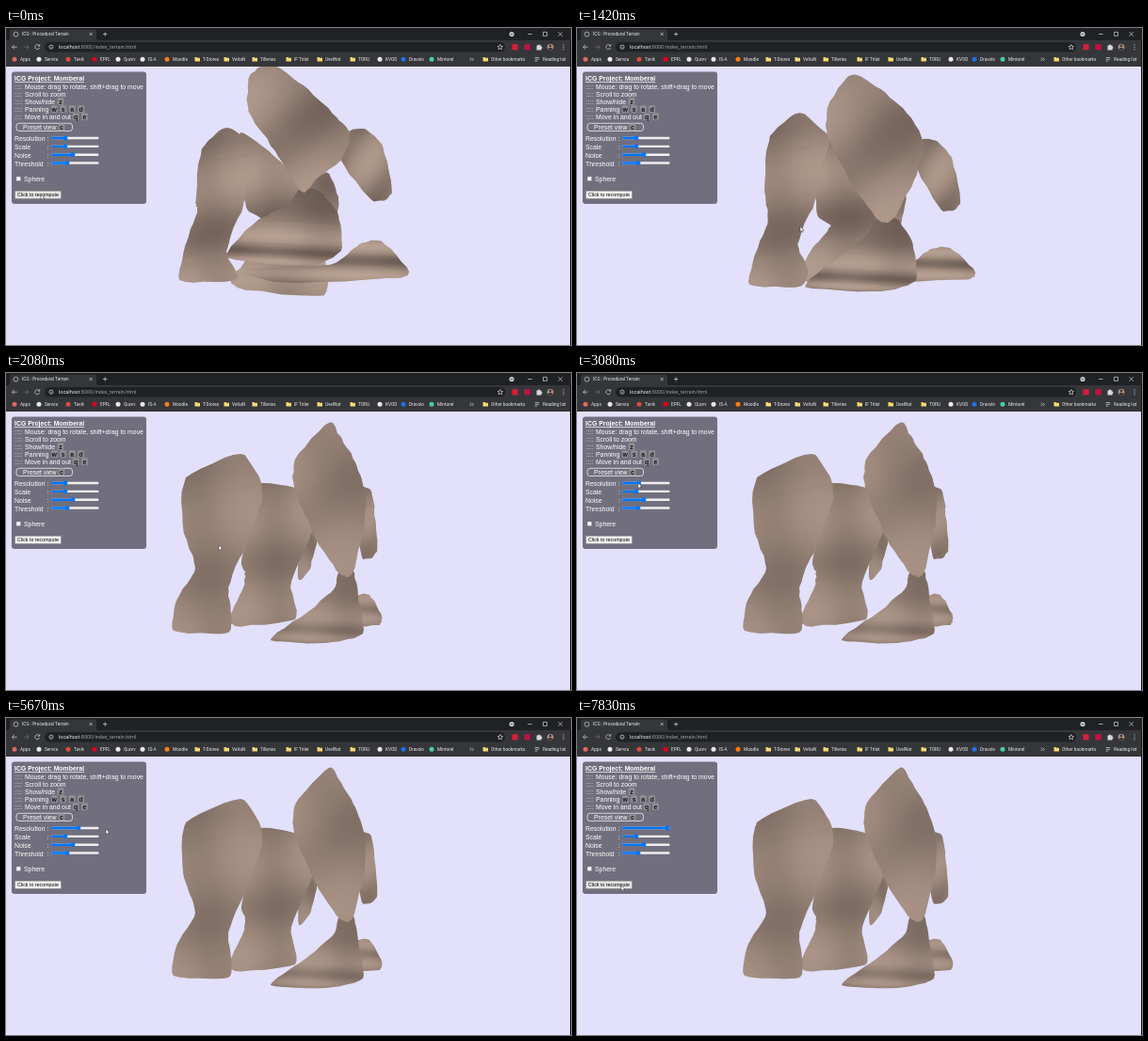
Animation of 600 by 337 pixels, one loop 8 s. Source, as an HTML page with a canvas:

```html
<!DOCTYPE html>
<html lang="en">
<head>
<meta charset="utf-8">
<title>Procedural Terrain</title>
<style>
html, body { margin: 0; width: 100%; height: 100%; overflow: hidden; background: #e2e0fa; }
canvas, svg { position: absolute; left: 0; top: 0; width: 100%; height: 100%; display: block; }
text { white-space: pre; }
.ui { font: 4.75px Roboto, "Open Sans", sans-serif; fill: #e8eaed; }
.panel { font: 6.88px "Liberation Sans", Arial, sans-serif; fill: #fff; }
.panel .key { font-weight: bold; fill: #16161a; text-anchor: middle; }
.line { fill: none; stroke: #d5d7da; stroke-width: .7; }
</style>
</head>
<body>
<canvas id="stage"></canvas>
<svg viewBox="0 0 600 337" preserveAspectRatio="none">
  <g class="ui">
    <rect width="600" height="13" fill="#202124"/>
    <path d="M0 13H2Q4 13 4 10V4Q4 1.5 6.5 1.5H93Q96 1.5 96 4V10Q96 13 98 13H600V41H0Z" fill="#35363a"/>
    <circle cx="10.5" cy="6.7" r="2.4" class="line"/>
    <text x="17" y="8.4">ICG : Procedural Terrain</text>
    <path class="line" d="M88.7 5l3 3m0-3l-3 3M103 6.5h4.4M105.2 4.3v4.4M554 6.5h4.5M570.5 4.4h4v4h-4zM586.5 4.3l4.4 4.4m0-4.4l-4.4 4.4"/>
    <circle cx="537" cy="6.5" r="2.6" fill="#c8cacd"/>
    <path d="M535.8 6l1.2 1.3 1.2-1.3" fill="none" stroke="#111" stroke-width=".6"/>
    <rect x="41" y="15" width="489" height="10.5" rx="5.2" fill="#202124"/>
    <path class="line" d="M11.6 20.2H6.6m2.3-2.4l-2.4 2.4 2.4 2.4"/>
    <path class="line" d="M19 20.2h5m-2.3-2.4l2.4 2.4-2.4 2.4" style="stroke:#777"/>
    <path class="line" d="M35.4 18.8a2.5 2.5 0 1 0 .2 2.3M35.8 17.3v1.9h-1.9"/>
    <circle class="line" cx="48" cy="20.2" r="2.1"/>
    <path class="line" d="M48 19.8v1.5M48 18.6v.5"/>
    <text x="56" y="22.1" style="font-size:5.5px">localhost<tspan fill="#9aa0a6">:8000/index_terrain.html</tspan></text>
    <path class="line" d="M524.8 17.5l.8 1.8 2 .2-1.5 1.3.4 2-1.7-1-1.7 1 .4-2-1.5-1.3 2-.2z"/>
    <rect x="537.5" y="17.3" width="6" height="6" fill="#d81f3c"/>
    <rect x="550.5" y="17.3" width="6" height="6" fill="#c81040"/>
    <path d="M563.5 18.5h1.5a1 1 0 0 1 2 0h1.5v1.6a1 1 0 0 1 0 2v1.4h-5z" fill="#d5d7da"/>
    <circle cx="578" cy="20.3" r="3.4" fill="#a98d82"/>
    <path d="M575.2 22.3q2.8-2.6 5.6 0a3.4 3.4 0 0 1-5.6 0M576.8 19a1.2 1.2 0 1 0 2.4 0 1.2 1.2 0 1 0-2.4 0" fill="#3b2d2b"/>
    <path d="M592 17.4v1m0 1.4v1m0 1.4v1" stroke="#d5d7da"/>
    <g id="marks"></g>
    <path class="line" d="M472 31.6l1.7 1.7-1.7 1.7m2.3-3.4l1.7 1.7-1.7 1.7" transform="translate(20.5)"/>
    <path class="line" d="M561.7 31.5h4.5m-4.5 1.8h4.5m-4.5 1.8h2.5"/>
  </g>
  <rect x="599" y="13" width="1" height="324" fill="#111"/>
  <g class="panel">
    <rect x="6" y="46.5" width="143" height="140.5" rx="3" fill="#716f7e"/>
    <text x="9" y="56" font-weight="bold" text-decoration="underline">ICG Project: Momberal</text>
    <g id="help"></g>
    <rect x="11" y="101.3" width="59.5" height="8.2" rx="2.8" fill="none" stroke="#fff" stroke-width=".7"/>
    <text x="18" y="107.8">Preset view</text>
    <g id="keys"></g>
    <g id="sliders"></g>
    <rect x="11" y="158" width="4.6" height="4.6" rx=".7" fill="#fff" stroke="#767676" stroke-width=".4"/>
    <text x="19" y="163">Sphere</text>
    <rect id="button" x="9.5" y="173.3" width="49" height="8.2" rx=".8" stroke="#767676" stroke-width=".4"/>
    <text x="12" y="179.3" style="font-size:5.3px;fill:#000">Click to recompute</text>
  </g>
  <path id="cursor" d="M0 0V5.6L1.3 4.4 2.2 6.4 3.1 6 2.2 4.1H4Z" fill="#fff" stroke="#222" stroke-width=".45"/>
</svg>
<script>
const TICK = 1000 / 12, TICKS = 96, RECOMPUTE = 54, SKY = '#e2e0fa';
const $ = id => document.getElementById(id);

function add(parent, tag, attrs, text) {
  const el = document.createElementNS('http://www.w3.org/2000/svg', tag);
  for (const k in attrs) el.setAttribute(k, attrs[k]);
  if (text) el.textContent = text;
  return parent.appendChild(el);
}

// Bookmarks bar: label, text x, icon colour
const FOLDER = '#f8d775', PLAIN = '#e8e8e8';
[['Apps', 15, '#e0695c'], ['Senvia', 41, PLAIN], ['Tavik', 72, '#e24a3b'], ['EPFL', 100, '#e2001a'],
 ['Quorv', 125, PLAIN], ['IS-A', 151, PLAIN], ['Moodle', 177, '#f98012'], ['T-Stores', 209, FOLDER],
 ['VeltaN', 240, FOLDER], ['Tilleries', 270, FOLDER], ['IF Trilet', 306, FOLDER], ['UvelNot', 339, FOLDER],
 ['TORU', 374, FOLDER], ['KVOD', 403, PLAIN], ['Dravolo', 428, '#1d73e8'], ['Mintorel', 458, '#45cfa5'],
 ['Other bookmarks', 515, FOLDER], ['Reading list', 570]
].forEach(([label, x, fill]) => {
  add($('marks'), 'text', { x, y: 35 }, label);
  if (fill === FOLDER) add($('marks'), 'path', { d: `M${x - 8.5} 31h2l.7.8h2.8v3.8h-5.5z`, fill });
  else if (fill) add($('marks'), 'circle', { cx: x - 6, cy: 33.3, r: 2.5, fill });
});

['Mouse: drag to rotate, shift+drag to move', 'Scroll to zoom', 'Show/hide', 'Panning', 'Move in and out']
  .forEach((label, i) => {
    const y = 64.5 + 8 * i;
    add($('help'), 'text', { x: 9.5, y, opacity: .8 }, '::::');
    add($('help'), 'text', { x: 20, y }, label);
  });

function keyRow(keys, x, y) {
  [...keys].forEach((key, i) => {
    const cx = x + 9.45 * i;
    add($('keys'), 'rect', { x: cx - 3.4, y: y - 6.2, width: 6.8, height: 7.6, rx: 1, fill: '#8f8f92' });
    add($('keys'), 'text', { x: cx, y, class: 'key' }, key);
  });
}
keyRow('z', 58, 80.5);
keyRow('wsad', 51.3, 88.5);
keyRow('qe', 74, 96.5);
keyRow('c', 59, 107.8);

const sliders = [['Resolution', 63], ['Scale', 63], ['Noise', 71], ['Threshold', 65]].map(([label, value], i) => {
  const g = $('sliders'), y = 120 + 8.85 * i, mid = y - 3;
  add(g, 'text', { x: 9, y }, label);
  add(g, 'text', { x: 43.5, y }, ':');
  add(g, 'rect', { x: 48, y: mid - 1.2, width: 50.5, height: 2.4, rx: 1.2, fill: '#efefef' });
  const bar = add(g, 'rect', { x: 48, y: mid - 1.2, height: 2.4, rx: 1.2, fill: '#0075ff' });
  const knob = add(g, 'circle', { cy: mid, r: 2.4, fill: '#0075ff' });
  const set = x => { bar.setAttribute('width', x - 48); knob.setAttribute('cx', x); };
  set(value);
  return set;
});

// A part runs between two views; its folds are a wave along one direction.
const parts = [];
const part = (from, to, fold) =>
  parts.push({ from: from.split(' ').map(Number), to: to.split(' ').map(Number), ...fold });

// nub
part('322 168 340 155 352 178 348 208 328 200',
     '312 170 324 164 331 172 324 205 311 220',
     { angle: 1.2, waves: 4, phase: 3.5 });
// middle arch
part('250 112 284 133 316 165 334 230 336 281 246 275 238 260 250 250 272 207 256 194 250 160',
     '270 117 310 124 330 155 303 222 307 262 243 269 239 256 252 228 254 212 250 200 262 145',
     { angle: 1.5, waves: 10, phase: -.8, depth: 1.3 });
// left slab and leg
part('235 103 268 126 260 150 252 188 234 236 246 262 238 270 184 269 192 228 203 196 201 180 207 126',
     '249 86 270 114 271 138 254 184 236 228 239 255 236 276 178 274 182 240 201 207 188 164 191 111',
     { angle: 1.4, waves: 10.7, phase: -2.35 });
// lower right lobe
part('250 258 345 252 375 231 398 228 426 258 415 266 300 270',
     '340 262 362 254 372 237 386 236 399 259 396 268 365 268',
     { angle: 1.6, waves: 10, phase: .2, depth: 1.6 });
// upper right lobe
part('364 113 382 110 400 130 409 178 388 185 357 142',
     '372 122 387 124 391 145 394 190 378 196 370 145',
     { angle: .6, waves: 9, phase: -2.9 });
// foot
part('316 176 336 180 354 205 357 243 320 259 237 250 270 212 300 196',
     '354 211 369 211 374 238 379 277 340 287 281 284 318 256 348 230',
     { angle: 1.62, waves: 12, phase: -1.2, depth: 1.5, pinch: 3 });
// upper right slab
part('284 41 318 62 352 95 366 114 358 143 332 168 316 180 288 138 260 94 261 57',
     '343 53 354 66 371 95 381 125 381 160 368 213 354 213 330 178 306 122 308 90',
     { angle: .9, waves: 9, phase: .2 });

// Linear keyframes: [tick, ...values]
function tween(keys, t) {
  const i = keys.findIndex(k => k[0] > t);
  if (i < 0) return keys[keys.length - 1].slice(1);
  if (i === 0) return keys[0].slice(1);
  const a = keys[i - 1], b = keys[i], k = (t - a[0]) / (b[0] - a[0]);
  return a.slice(1).map((v, j) => v + (b[j + 1] - v) * k);
}
// The drag tilts first, then swings sideways.
const turnKeys = [[10, -.05, -.18], [13, 0, 0], [17, .13, .75], [24, 1, 1]];
const resolutionKeys = [[36, 63], [41, 77], [74, 77], [80, 96]];
const cursorKeys = [[4, 37, 177], [10, 235, 190], [13, 234, 194], [17, 237, 211], [24, 226, 183], [29, 226, 183],
  [34, 62, 117], [36, 62, 117], [41, 76, 117], [49, 40, 177], [54, 40, 177], [68, 106, 118],
  [74, 77, 117], [80, 96, 117], [83, 96, 117], [91, 47, 178]];

const ctx = $('stage').getContext('2d');
const noise = n => { const s = Math.sin(n * 127.1) * 43758.5453; return (s - Math.floor(s)) * 2 - 1; };

function resize() {
  const dpr = window.devicePixelRatio || 1;
  ctx.canvas.width = innerWidth * dpr;
  ctx.canvas.height = innerHeight * dpr;
}

// Slightly rounded spline through the points, with a seeded ragged edge
function outline(pts, rough, seed) {
  const path = new Path2D(), n = pts.length, steps = 6, tension = .3;
  for (let i = 0; i < n; i++) {
    const [p, a, b, q] = [-1, 0, 1, 2].map(d => pts[(i + d + n) % n]);
    for (let s = 0; s < steps; s++) {
      const k = s / steps, h = k * k * (3 - 2 * k), jag = s && rough;
      const [x, y] = [0, 1].map(c => a[c] + (b[c] - a[c]) * h
        + tension * ((b[c] - p[c]) * k * (1 - k) ** 2 - (q[c] - a[c]) * k * k * (1 - k))
        + jag * noise(seed + i * 13 + s * 2 + c));
      path.lineTo(x, y);
    }
  }
  path.closePath();
  return path;
}

function foldGradient(w, h, angle, tone) {
  const cx = Math.cos(angle), sy = Math.sin(angle);
  const reach = (Math.abs(w * cx) + Math.abs(h * sy)) / 2;
  const g = ctx.createLinearGradient(-cx * reach, -sy * reach, cx * reach, sy * reach);
  for (let s = 0; s <= 1; s += 1 / 32) {
    const v = tone(s);
    g.addColorStop(s, v > 0 ? `rgba(214,189,172,${v})` : `rgba(52,43,40,${-v})`);
  }
  return g;
}

function drawPart({ from, to, angle, waves, phase, depth = 1, pinch = 1 }, index, turn, rough) {
  const flat = from.map((v, j) => v + (to[j] - v) * turn[j % 2]);
  const pts = [];
  for (let j = 0; j < flat.length; j += 2) pts.push([flat[j], flat[j + 1]]);
  const [x0, x1, y0, y1] = [0, 1].flatMap(c => {
    const all = pts.map(p => p[c]);
    return [Math.min(...all), Math.max(...all)];
  });
  const w = x1 - x0, h = y1 - y0, strength = .27 * depth * (1 - .5 * turn[0]);
  const shape = outline(pts, rough, index * 97);
  ctx.save();
  ctx.fillStyle = '#988478';
  ctx.fill(shape);
  ctx.clip(shape);
  ctx.translate(x0 + w / 2, y0 + h / 2);
  const layer = (dir, tone) => {
    ctx.fillStyle = foldGradient(w, h, dir, tone);
    ctx.fillRect(-w, -h, 2 * w, 2 * h);
  };
  layer(angle, s => strength * Math.sin(waves * s ** pinch + phase));
  layer(angle - Math.PI / 2, s => .12 * Math.sin(7 * s + index));
  ctx.restore();
}

function frame() {
  const t = Math.floor((performance.now() + 4) / TICK) % TICKS;
  const turn = tween(turnKeys, t);
  const [x, y] = tween(cursorKeys, t);
  ctx.setTransform(ctx.canvas.width / 600, 0, 0, ctx.canvas.height / 337, 0, 0);
  ctx.fillStyle = SKY;
  ctx.fillRect(0, 0, 600, 337);
  parts.forEach((p, i) => drawPart(p, i, turn, t < RECOMPUTE ? .9 : .4));
  sliders[0](tween(resolutionKeys, t)[0]);
  $('cursor').setAttribute('transform', `translate(${x} ${y})`);
  const over = x > 9 && x < 59 && y > 173 && y < 182;
  $('button').setAttribute('fill', over ? '#e5e5e5' : '#f2f2f2');
  requestAnimationFrame(frame);
}
addEventListener('resize', resize);
resize();
frame();
</script>
</body>
</html>
```
